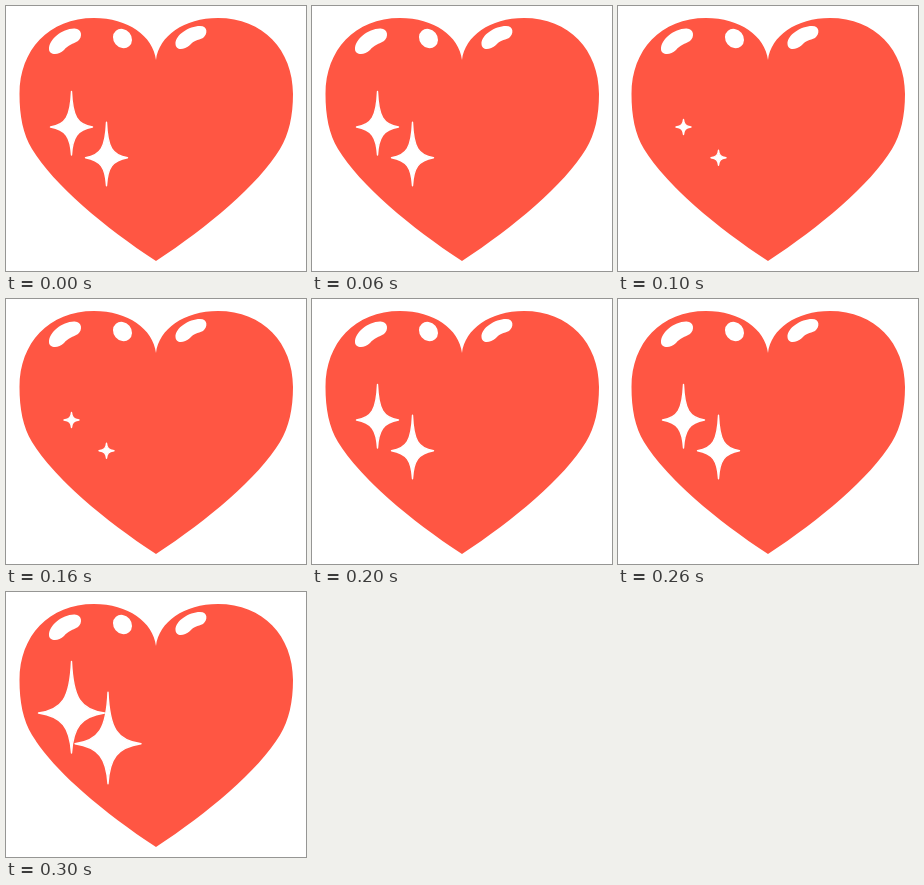
Recreate the animation shown at these times as an HTML page. Size 300x265 px, loop 400 ms.

```html
<!DOCTYPE html>
<html lang="en">
<head>
<meta charset="utf-8">
<title>Sparkling heart</title>
<style>
  html, body { margin: 0; width: 100%; height: 100%; overflow: hidden; background: #fff; }
  svg { display: block; width: 100%; height: 100%; }
</style>
</head>
<body>
<svg viewBox="0 0 300 265">
  <path fill="#ff5643" d="M150 54C147 30 122 12 88 12C43 12 13.5 44 13.5 88
    C13.5 110 17 128 26 143C48 179 98 221 150 255
    C202 221 252 179 274 143C283 128 287 110 287 88C287 44 257 12 212 12C178 12 153 30 150 54Z"/>
  <g fill="#fff">
    <path d="M43 43C43 33 56 23 68 22.5C76 22 77 31 72 35C67 38 62 39 58 44C52 50 43 49 43 43Z"/>
    <ellipse cx="116.5" cy="32.5" rx="9" ry="10.2" transform="rotate(-40 116.5 32.5)"/>
    <path d="M169.5 38C169 29 183 20 194 20C202 20 202 28 197 32C192 34 187 35 184 39C178 44 170 45 169.5 38Z"/>
    <path id="sparkles" stroke="#fff" stroke-width="1.4" stroke-linejoin="round"/>
  </g>
</svg>
<script>
const STEP = 100;
const sparkles = document.getElementById('sparkles');

// Arm lengths of a sparkle, and the horizontal gap between the two.
const small = { side: 7.5, up: 7.5, down: 7.5, gap: 35 };
const medium = { side: 21, up: 35.5, down: 28, gap: 35 };
const large = { side: 33, up: 51.5, down: 40, gap: 36.5 };
const poses = [medium, small, medium, large];

function sparkle(x, y, { side, up, down }) {
  // One concave edge, from a vertical tip to a horizontal tip.
  const edge = (sx, sy) => [
    [0, sy < 0 ? -up : down],
    [sx * side * 0.05, sy * down * 0.36],
    [sx * side * 0.28, sy * down * 0.09],
    [sx * side, 0],
  ];
  const curve = points =>
    'C' + points.slice(1).map(([dx, dy]) => `${x + dx} ${y + dy}`).join(' ');
  return `M${x} ${y - up}` + curve(edge(1, -1)) + curve(edge(1, 1).reverse()) +
    curve(edge(-1, 1)) + curve(edge(-1, -1).reverse()) + 'Z';
}

function draw(time) {
  const pose = poses[Math.floor(time / STEP) % poses.length];
  sparkles.setAttribute('d', sparkle(65.5, 121, pose) + sparkle(65.5 + pose.gap, 151.7, pose));
}

const start = performance.now();
function tick() {
  draw(performance.now() - start);
  requestAnimationFrame(tick);
}
tick();
</script>
</body>
</html>
```
